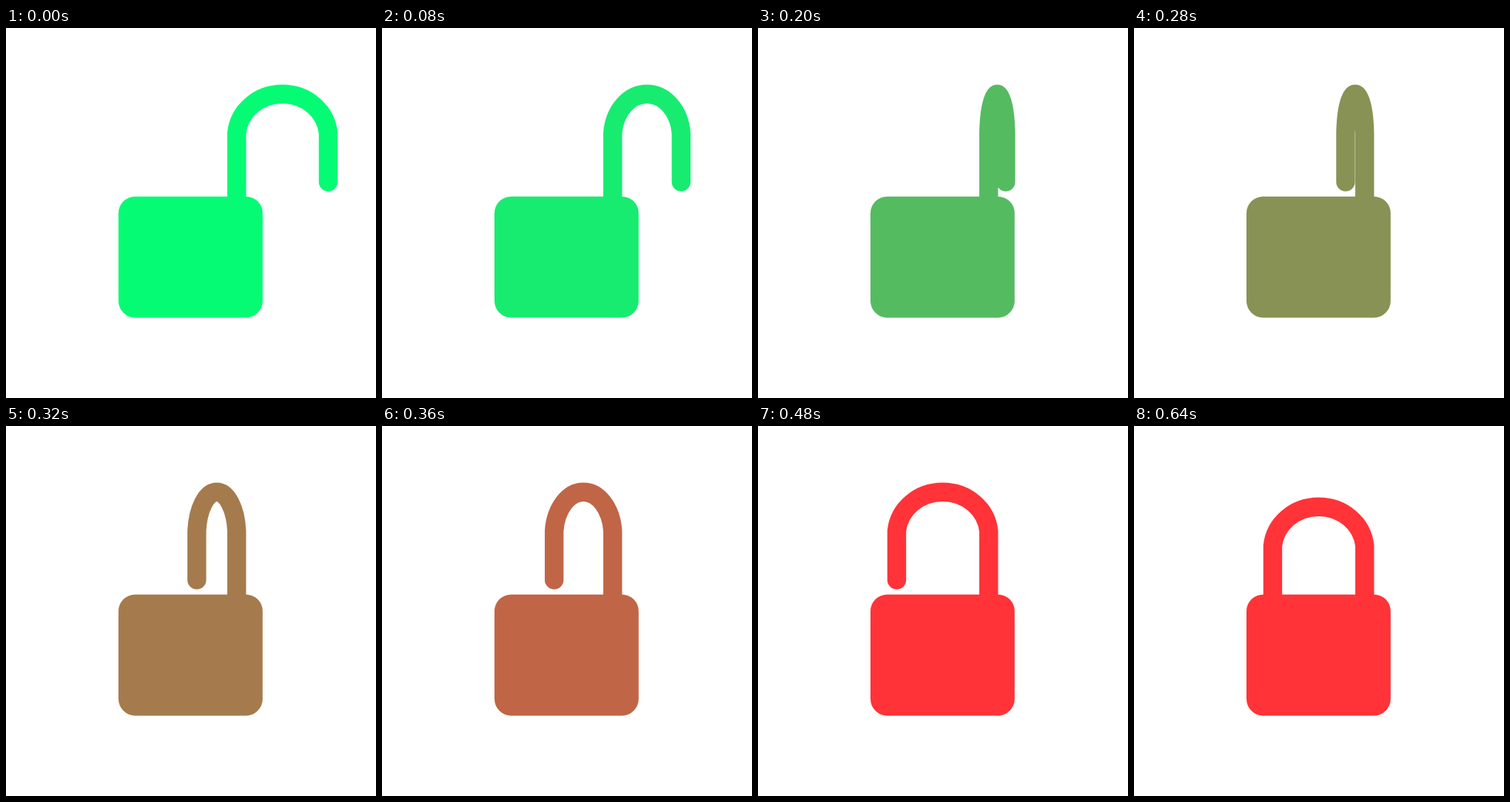
An HTML page for the animation above (760 ms loop, 500x500 px).

```html
<!DOCTYPE html>
<html lang="en">
<head>
<meta charset="utf-8">
<title>Padlock</title>
<style>
  html, body { margin: 0; height: 100%; overflow: hidden; background: #fff; }
  svg { display: block; width: 100vw; height: 100vh; }
</style>
</head>
<body>
<svg viewBox="0 0 500 500">
  <g id="lock" fill="#05fb74" stroke="#05fb74">
    <path id="shackle" fill="none" stroke-width="25.4" stroke-linecap="round" stroke-linejoin="round"/>
    <rect x="152" y="227.7" width="194.8" height="163.7" rx="22.5" stroke="none"/>
  </g>
</svg>
<script>
const LOOP = 760, STEP = 40;
const HINGE = 311.75, TOP = 89.3, SHOULDER = 142, TIP = 208;
const OPEN = [5, 251, 116], SHUT = [255, 51, 56];

// [step, value] keys: reach of the free leg, and colour mix
const REACH = [[0, 123.7], [3, 69.5], [5, 23.1], [7, -25.8], [9, -79.1], [12, -124.3]];
const MIX = [[0, 0], [3, .137], [5, .32], [7, .525], [9, .752], [12, 1]];

const lock = document.getElementById('lock');
const shackle = document.getElementById('shackle');

// Smooth curve through the keys, at rest on both ends
function ease(keys, k) {
  const last = keys.length - 1;
  if (k >= keys[last][0]) return keys[last][1];
  const i = keys.findIndex(key => key[0] > k) - 1;
  const slope = j => j === 0 || j === last ? 0
    : (keys[j + 1][1] - keys[j - 1][1]) / (keys[j + 1][0] - keys[j - 1][0]);
  const [ka, a] = keys[i], [kb, b] = keys[i + 1];
  const d = kb - ka, u = (k - ka) / d, v = 1 - u;
  return a + (b - a) * u * u * (3 - 2 * u)
    + d * u * v * (slope(i) * v - slope(i + 1) * u);
}

function shacklePath(reach, drop) {
  const x = f => HINGE + reach * f;
  const top = TOP + drop, low = SHOULDER + drop, ctrl = low - 30;
  return `M${HINGE} 245V${low}`
    + `C${x(.025)} ${ctrl} ${x(.24)} ${top} ${x(.5)} ${top}`
    + `C${x(.76)} ${top} ${x(.975)} ${ctrl} ${x(1)} ${low}`
    + `V${TIP + drop}`;
}

function draw(now) {
  const k = Math.floor(now % LOOP / STEP);
  const drop = k < 15 ? 0 : k < 16 ? 10 : 20;
  const mix = ease(MIX, k);
  const color = `rgb(${OPEN.map((c, i) => Math.round(c + (SHUT[i] - c) * mix))})`;
  shackle.setAttribute('d', shacklePath(ease(REACH, k), drop));
  lock.setAttribute('fill', color);
  lock.setAttribute('stroke', color);
}

const start = performance.now();
function tick() {
  draw(performance.now() - start);
  requestAnimationFrame(tick);
}
tick();
</script>
</body>
</html>
```
